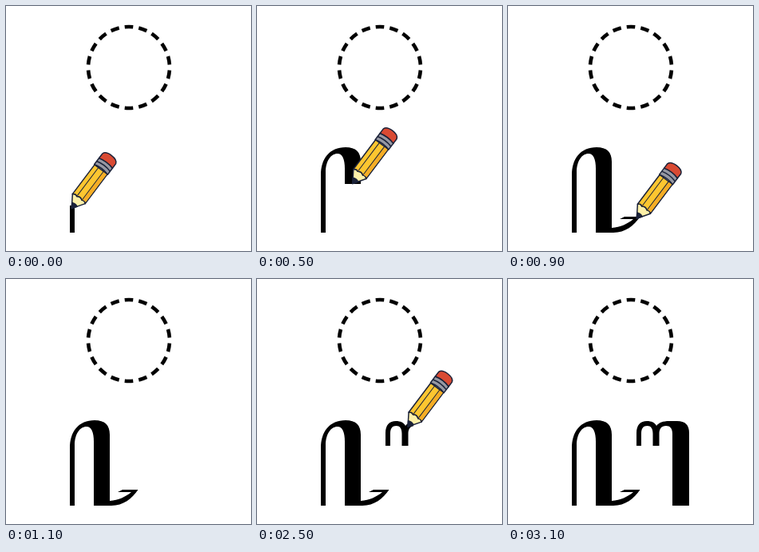
These frames come from a looping animation (307x307 px, 5.1 s). An HTML page:

```html
<!DOCTYPE html>
<html lang="en">
<head>
<meta charset="utf-8">
<title>Letter strokes</title>
<style>
  html, body { margin: 0; width: 100%; height: 100%; overflow: hidden; background: #fff; }
  svg { display: block; width: 100%; height: 100%; }
  .guide { fill: none; stroke: #fff; stroke-linejoin: round; }
  #pencil { stroke: #1b2239; stroke-width: 1.5; stroke-linejoin: round; }
</style>
</head>
<body>
<svg viewBox="0 0 307 307">
  <defs>
    <mask id="m1" maskUnits="userSpaceOnUse" x="0" y="0" width="307" height="307">
      <path class="guide" id="g1" stroke-width="28" d="M83.5 284V208C83.5 191 92 181 104 181C116 181 121 187 121 199V277C124 283 130 284 137 282Q152 278 163 264H140"/>
    </mask>
    <mask id="m2" maskUnits="userSpaceOnUse" x="0" y="0" width="307" height="307">
      <path class="guide" id="g2" stroke-width="24" d="M164 209V191Q164 181 174 181Q185 181 185.5 192V209V192Q187 181 200 181Q217 181 217 193V284"/>
    </mask>
  </defs>

  <circle cx="154" cy="77" r="51" fill="none" stroke="#000" stroke-width="4.6"
    pathLength="360" stroke-dasharray="12 8" stroke-dashoffset="6" transform="rotate(-90 154 77)"/>

  <path id="l1" d="M80 284V212C80 191 91 177 111 177C124 177 130 183 130 195V278C141 277 150 273 157 267H140L146 264H165.5C158 275 147 284 132 284H110V204C110 192 107 185 101 185C92 185 86 195 86 208V284Z"/>
  <path id="l2" d="M161 209V193C161 183 166 178 174 178C180 178 184 180 186 184C189 180 194 178 202 178H212C222 178 227 183 227 193V284H206V194C206 187 203 184 198 184C192 184 189.5 188 189.5 194V209H181.5V194C181.5 187 179 184 174.5 184C169.5 184 167 187 167 194V209Z"/>

  <!-- tip at the origin, body along +x -->
  <g id="pencil">
    <g transform="rotate(-53)">
      <path fill="#fdf0a8" d="M-2 0L13 -10Q16 -7 14 -4Q17 0 14 4Q16 7 13 10Z"/>
      <path fill="#1b2239" d="M-2 0L4 -4Q6 0 4 4Z"/>
      <path fill="#fdc630" d="M13 -10H59V10H13Q16 7 14 4Q17 0 14 -4Q16 -7 13 -10Z"/>
      <path fill="#f5ad25" stroke="none" d="M15 4.5H58.3V9.3H15Z"/>
      <path fill="none" stroke-width="1" d="M15 -4H59M15 4H59"/>
      <path fill="#9698a3" d="M59 -10.5Q62 0 59 10.5H69Q72 0 69 -10.5Z"/>
      <path fill="none" d="M64 -10.5Q67 0 64 10.5"/>
      <path fill="#d94a33" d="M69 -10.5H76Q81 -9 81 0T76 10.5H69Q72 0 69 -10.5Z"/>
    </g>
  </g>
</svg>
<script>
  const LOOP = 5100, STEP = 100;
  const $ = id => document.getElementById(id);
  const pencil = $('pencil');

  const letters = [
    { id: 1, start: 0, steps: 11, reach: n => 32 + 26.5 * n },
    { id: 2, start: 2100, steps: 10, reach: n => 18 + 19.6 * n + 10.4 * Math.max(0, n - 7) }
  ].map(l => ({ ...l, shape: $('l' + l.id), guide: $('g' + l.id) }));

  function drawLetter({ id, start, steps, reach, shape, guide }, t) {
    const n = Math.floor((t - start) / STEP);
    const writing = n >= 0 && n < steps;
    shape.style.display = n < 0 ? 'none' : '';
    shape.style.mask = writing ? `url(#m${id})` : 'none';
    if (!writing) return false;
    const len = Math.min(reach(n), guide.getTotalLength());
    const p = guide.getPointAtLength(len);
    // ink runs slightly ahead of the tip
    guide.style.strokeDasharray = `${len + (n > 6 ? 8 : 2)} 999`;
    pencil.setAttribute('transform', `translate(${p.x} ${p.y})`);
    return true;
  }

  function frame(now) {
    const t = now % LOOP;
    const active = letters.map(l => drawLetter(l, t)).includes(true);
    pencil.style.display = active ? '' : 'none';
    requestAnimationFrame(frame);
  }
  frame(0);
</script>
</body>
</html>
```
